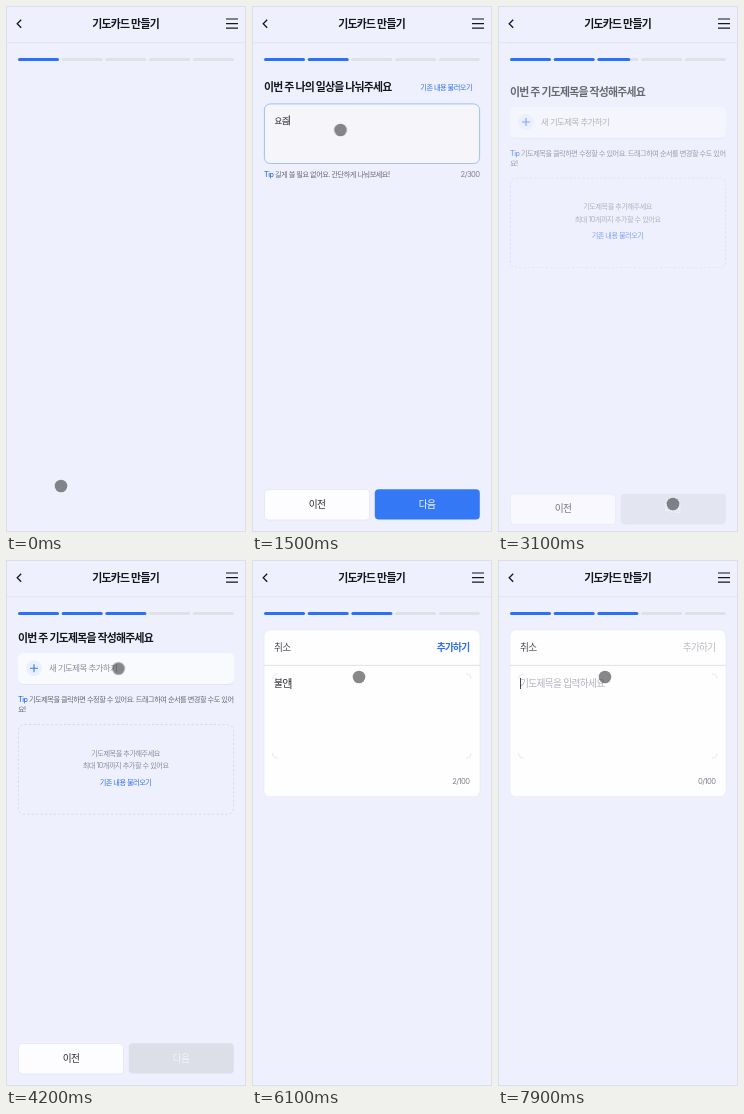
An HTML page that plays this animation: 240 px wide and 526 px high, repeating every 8000 ms.

```html
<!DOCTYPE html>
<html lang="ko">
<head>
<meta charset="utf-8">
<title>기도카드 만들기</title>
<style>
html, body { margin: 0; width: 100%; height: 100%; overflow: hidden; background: #eef0fd; }
svg { display: block; width: 100vw; height: 100vh; }
text {
  font-family: Inter, "Noto Sans CJK KR", "Noto Sans CJK", sans-serif;
  letter-spacing: -.07em; white-space: pre; fill: #26282e;
}
.title { font-size: 10.9px; font-weight: 700; fill: #15171c; }
.hero { font-size: 14.7px; font-weight: 700; fill: #15171c; }
.label { font-size: 9.7px; font-weight: 500; }
.body-text { font-size: 8.45px; }
.small { font-size: 7.2px; fill: #656973; }
.count { font-size: 7.6px; fill: #7d808a; }
.blue { fill: #2f70ea; font-weight: 500; }
.pale { fill: #8b8e98; }
.mid { text-anchor: middle; }
.end { text-anchor: end; }
.card { fill: #fdfdff; stroke: #e3e5ee; stroke-width: .8; }
.bar { fill: #dfe1e6; }
.bar.on { fill: #2b71f4; }
.off { --next: #dcdfe8; --ink: #f3f4f9; }
.ready { --next: #3478f6; --ink: #fff; }
.caret { fill: #15171c; }

.page > * { opacity: 0; animation: 8s linear infinite both; --y: 20px; }
.page > .foot { --y: 12px; }
.intro > * { animation-name: intro; }
.diary > * { animation-name: diary; }
.empty > * { animation-name: empty; }
.list > * { animation-name: list; }
.editor > * { animation-name: editor; }
#second { animation: second 8s step-end infinite; }
#bar2 { animation: bar2 8s linear infinite both; }
#bar3 { animation: bar3 8s linear infinite both; }
#pointer { fill: rgba(72, 72, 76, .65); animation: pointer 8s ease-in-out infinite both; }

@keyframes intro {
  0%, 1% { opacity: 0; transform: translateY(var(--y)); animation-timing-function: ease-out; }
  5%, 11.25% { opacity: 1; transform: none; }
  12.875%, 100% { opacity: 0; transform: none; }
}
@keyframes diary {
  0%, 13% { opacity: 0; transform: translateY(var(--y)); animation-timing-function: ease-out; }
  16.75%, 35.5% { opacity: 1; transform: none; }
  37%, 100% { opacity: 0; transform: none; }
}
@keyframes empty {
  0%, 37% { opacity: 0; transform: translateY(var(--y)); animation-timing-function: ease-out; }
  41%, 53.5% { opacity: 1; transform: none; }
  55%, 100% { opacity: 0; transform: none; }
}
@keyframes list {
  0%, 61.75% { opacity: 0; transform: translateY(var(--y)); animation-timing-function: ease-out; }
  65%, 68% { opacity: 1; transform: none; }
  69.5% { opacity: 0; transform: none; }
  69.6%, 88% { opacity: 0; transform: translateY(var(--y)); animation-timing-function: ease-out; }
  91.5%, 94.5% { opacity: 1; transform: none; }
  96%, 100% { opacity: 0; transform: none; }
}
@keyframes editor {
  0%, 55% { opacity: 0; transform: translateY(var(--y)); animation-timing-function: ease-out; }
  57%, 60.5% { opacity: 1; transform: none; }
  61.75% { opacity: 0; transform: none; }
  61.8%, 69.5% { opacity: 0; transform: translateY(var(--y)); animation-timing-function: ease-out; }
  72%, 86.5% { opacity: 1; transform: none; }
  88% { opacity: 0; transform: none; }
  88.1%, 96% { opacity: 0; transform: translateY(var(--y)); animation-timing-function: ease-out; }
  98.5%, 100% { opacity: 1; transform: none; }
}
@keyframes second {
  0% { visibility: hidden; }
  80%, 100% { visibility: visible; }
}
@keyframes bar2 {
  0%, 11.5% { width: 0; animation-timing-function: ease-in-out; }
  15.6%, 100% { width: 41px; }
}
@keyframes bar3 {
  0%, 36% { width: 0; animation-timing-function: ease-in-out; }
  40%, 100% { width: 41px; }
}
@keyframes pointer {
  0%, .5% { transform: translate(55px, 480px); }
  10%, 14% { transform: translate(124.5px, 324px); }
  18%, 29.5% { transform: translate(88.5px, 124px); }
  34.5%, 45.5% { transform: translate(175px, 498px); }
  51.5%, 57.5% { transform: translate(112.5px, 108.5px); }
  60%, 62% { transform: translate(198px, 89px); opacity: 1; }
  63% { transform: translate(190px, 94px); opacity: 0; }
  65% { transform: translate(107px, 117px); opacity: 0; }
  66.5%, 83% { transform: translate(107px, 117px); opacity: 1; }
  85% { transform: translate(184px, 107px); }
  86%, 89.5% { transform: translate(198px, 89px); }
  93.5%, 100% { transform: translate(107px, 117px); }
}
</style>
</head>
<body>
<svg viewBox="0 0 240 526" preserveAspectRatio="none">
  <defs>
    <g id="buttons">
      <rect class="card" x="12.4" y="483.4" width="105.2" height="30.6" rx="4"/>
      <text class="label mid" x="65" y="501.9">이전</text>
      <rect x="122.8" y="483.2" width="105" height="30.4" rx="4" style="fill:var(--next)"/>
      <text class="label mid" x="175" y="501.7" style="fill:var(--ink)">다음</text>
    </g>
    <g id="adder">
      <text class="title" x="12" y="82.2">이번 주 기도제목을 작성해주세요</text>
      <rect x="12" y="94" width="216" height="31" rx="5" fill="#e4e6ef"/>
      <rect x="12" y="93" width="216" height="31" rx="5" fill="#f9fafd"/>
      <circle cx="28" cy="108.3" r="8" fill="#eaf1fd"/>
      <path d="M24 108.3h8M28 104.3v8" stroke="#3478f6" stroke-width="1.1"/>
      <text class="body-text pale" x="43" y="111.4">새 기도제목 추가하기</text>
      <text class="small" x="12" y="142"><tspan class="blue">Tip</tspan> 기도제목을 클릭하면 수정할 수 있어요. 드래그하여 순서를 변경할 수도 있어</text>
      <text class="small" x="12" y="152">요!</text>
    </g>
    <g id="row">
      <rect class="card" x="12.4" y="165" width="215.2" height="33.5" rx="5"/>
      <path d="M25 178.2v8M28.5 178.2v8" stroke="#8d9099" stroke-width="1.5" stroke-linecap="round" stroke-dasharray="0 3.8"/>
      <circle cx="211.5" cy="181.5" r="5.2" fill="#9a9da7"/>
      <path d="M209.6 179.6l3.8 3.8m0-3.8l-3.8 3.8" stroke="#fff" stroke-width="1.1"/>
    </g>
  </defs>

  <rect width="240" height="526" fill="#eef0fd"/>
  <path d="M0 36.8h240" stroke="#e0e3ef" stroke-width=".9"/>
  <path d="M15.2 13.8l-4 4 4 4" fill="none" stroke="#15171c" stroke-width="1.3"/>
  <path d="M220 13h12M220 17.6h12M220 22.2h12" stroke="#15171c" stroke-width="1.2"/>
  <text class="title mid" x="119.6" y="21.5">기도카드 만들기</text>

  <rect class="bar" x="55.7" y="52" width="41" height="3" rx="1.5"/>
  <rect class="bar" x="99.4" y="52" width="41" height="3" rx="1.5"/>
  <rect class="bar" x="143.1" y="52" width="41" height="3" rx="1.5"/>
  <rect class="bar" x="186.8" y="52" width="41" height="3" rx="1.5"/>
  <rect class="bar on" x="12" y="52" width="41" height="3" rx="1.5"/>
  <rect class="bar on" id="bar2" x="55.7" y="52" height="3" rx="1.5"/>
  <rect class="bar on" id="bar3" x="99.4" y="52" height="3" rx="1.5"/>

  <g class="page intro">
    <g>
      <text class="hero mid" x="119.6" y="264.8">이번 주 기도카드 만들기</text>
      <text class="label mid" x="119.6" y="285.8" style="fill:#6b6e78;font-weight:400">매주 나의 일상과 기도제목을 나누고 말씀을 받아보세요</text>
      <rect x="12" y="305" width="216" height="30.3" rx="4" fill="#3478f6"/>
      <text class="label mid" x="119.6" y="323.8" style="fill:#fff">시작하기</text>
    </g>
  </g>

  <g class="page diary">
    <g>
      <text class="title" x="12" y="85">이번 주 나의 일상을 나눠주세요</text>
      <text class="small blue end" x="220" y="83.8" style="fill:#2f70ea">기존 내용 불러오기</text>
      <rect x="12.4" y="97.9" width="215.2" height="59.6" rx="6" fill="#f6f5fa" stroke="#93bdf3" stroke-width=".9"/>
      <text class="body-text" id="line1" x="22.5" y="117.5"></text>
      <text class="body-text" id="line2" x="22.5" y="130.2"></text>
      <rect class="caret" id="diaryCaret" width=".8" height="10"/>
      <text class="small" x="12" y="170.6"><tspan class="blue">Tip</tspan> 길게 쓸 필요 없어요. 간단하게 나눠보세요!</text>
      <text class="count end" id="diaryCount" x="227.6" y="170.8"></text>
    </g>
    <g class="foot off" id="diaryFoot"><use href="#buttons"/></g>
  </g>

  <g class="page empty">
    <g>
      <use href="#adder"/>
      <rect x="12.4" y="164.6" width="215.2" height="89.6" rx="6" fill="none" stroke="#d6d9e4" stroke-width=".9" stroke-dasharray="2.4 2"/>
      <text class="small pale mid" x="119.6" y="195.6" style="fill:#8b8e98">기도제목을 추가해주세요</text>
      <text class="small pale mid" x="119.6" y="208.2" style="fill:#8b8e98">최대 10개까지 추가할 수 있어요</text>
      <text class="small blue mid" x="119.6" y="224.7" style="fill:#2f70ea">기존 내용 불러오기</text>
    </g>
    <g class="foot off"><use href="#buttons"/></g>
  </g>

  <g class="page list">
    <g>
      <use href="#adder"/>
      <use href="#row"/>
      <text class="body-text" x="37.5" y="184.7">매 순간 주님의 뜻을 먼저 생각하게 해주세요</text>
      <g id="second">
        <use href="#row" y="38"/>
        <text class="body-text" x="37.5" y="222.7">불안한 마음 대신 평안으로 채워주세요.</text>
      </g>
    </g>
    <g class="foot ready"><use href="#buttons"/></g>
  </g>

  <g class="page editor">
    <g>
      <rect x="12" y="70" width="216" height="166.6" rx="6" fill="#fefeff" stroke="#e6e8f2" stroke-width=".6"/>
      <path d="M12 105.4h216" stroke="#dcdee6" stroke-width=".9"/>
      <path d="M20.5 119q0-5 5-5M214 114q5 0 5 5M219 193q0 5-5 5M25.5 198q-5 0-5-5" fill="none" stroke="#dfe1e8" stroke-width=".8"/>
      <text class="label" x="22" y="91.2" style="fill:#4a4d56">취소</text>
      <text class="label end" id="add" x="217.6" y="91.2">추가하기</text>
      <text class="label" id="prayer" x="22" y="127.2" style="font-weight:400"></text>
      <rect class="caret" id="prayerCaret" y="118" width=".8" height="11"/>
      <text class="count end" id="prayerCount" x="217.6" y="224.2"></text>
    </g>
  </g>

  <circle id="pointer" r="6.3"/>
  <rect x=".4" y=".4" width="239.2" height="525.2" fill="none" stroke="#d8dbe6" stroke-width=".8"/>
</svg>
<script>
const LOOP = 8000;
const $ = id => document.getElementById(id);
const diary = ['요즘 일이 계속 쌓여서 좀 지치는 것 같아요. 그래도 동료들이', '랑 웃으면서 버티고 있어요'];
const prayers = [
  { text: '매 순간 주님의 뜻을 먼저 생각하게 해주세요', from: 4480, to: 4780, until: 5250 },
  { text: '불안한 마음 대신 평안으로 채워주세요.', from: 6060, to: 6600, until: 7400 },
  { text: '', from: 0, to: 1, until: LOOP }
];

const typed = (t, from, to, length) =>
  Math.round(length * Math.min(1, Math.max(0, (t - from) / (to - from))));

function setText(el, value) {
  if (el.textContent !== value) el.textContent = value;
}

function endOf(el) {
  return +el.getAttribute('x') + (el.textContent ? el.getComputedTextLength() : 0);
}

function drawDiary(t) {
  const [first, rest] = diary;
  const n = typed(t, 1460, 2270, first.length + rest.length);
  setText($('line1'), first.slice(0, n));
  setText($('line2'), rest.slice(0, Math.max(0, n - first.length)));
  setText($('diaryCount'), n + '/300');
  const wrapped = n > first.length;
  $('diaryCaret').setAttribute('x', endOf($(wrapped ? 'line2' : 'line1')));
  $('diaryCaret').setAttribute('y', wrapped ? 122 : 109.3);
  $('diaryFoot').setAttribute('class', 'foot ' + (n ? 'ready' : 'off'));
}

function drawPrayer(t) {
  const entry = prayers.find(p => t < p.until);
  const n = typed(t, entry.from, entry.to, entry.text.length);
  const field = $('prayer');
  setText(field, n ? entry.text.slice(0, n) : '기도제목을 입력하세요');
  field.style.fill = n ? '#26282e' : '#b0b3bc';
  setText($('prayerCount'), n + '/100');
  $('add').style.fill = n ? '#2f70ea' : '#b8bbc3';
  $('add').style.fontWeight = n ? 600 : 400;
  $('prayerCaret').setAttribute('x', n ? endOf(field) : 22);
  $('prayerCaret').style.opacity = n && n === entry.text.length ? 0 : 1;
}

let start;
function frame(now) {
  start ??= now;
  const t = (now - start) % LOOP;
  drawDiary(t);
  drawPrayer(t);
  requestAnimationFrame(frame);
}
requestAnimationFrame(frame);
</script>
</body>
</html>
```
